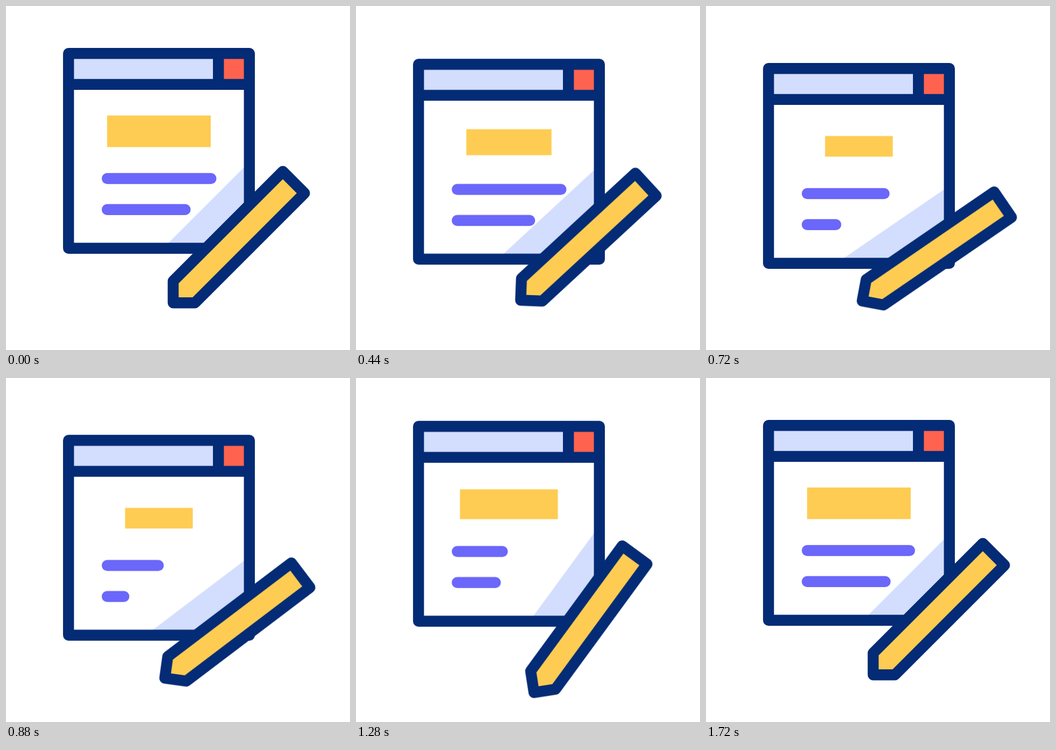
Animation, 640 px wide and 640 px high, one loop 1.76 s. Source, as an HTML page:

```html
<!DOCTYPE html>
<html lang="en">
<head>
<meta charset="utf-8">
<title>Editing a page</title>
<style>
  html, body { margin: 0; width: 100%; height: 100%; overflow: hidden; background: #fff; }
  svg { display: block; width: 100vw; height: 100vh; }

  .outline { stroke: #042b75; stroke-width: 20.4; stroke-linejoin: round; stroke-linecap: round; }
  .text { stroke: #6a67fa; stroke-width: 20.4; stroke-linecap: round; }
  .yellow { fill: #fecc52; }
  .pale { fill: #d3ddfd; }

  .window, .hold, .slide, .tilt, .banner, .text { animation: 1760ms linear infinite; }
  .window { --drop: 28px; animation-name: drop; }
  .hold { --drop: -28px; animation-name: drop; } /* cancels the window's own drop */
  .slide { animation-name: slide; }
  .tilt { animation-name: tilt; transform-origin: 433.4px 430px; }
  .banner { animation-name: shrink; transform-origin: 284.5px 233px; }
  .long { animation-name: long; }
  .short { animation-name: short; }

  @keyframes drop {
    0%, 6.42% { transform: translateY(0); animation-timing-function: cubic-bezier(.6, 0, .5, 1); }
    35.45%, 47.78% { transform: translateY(var(--drop)); animation-timing-function: cubic-bezier(.42, 0, .4, 1); }
    80.4%, 100% { transform: translateY(0); }
  }
  @keyframes shrink {
    0%, 5.23% { transform: scale(1); animation-timing-function: cubic-bezier(.6, 0, .5, 1); }
    41.7%, 51.02% { transform: scale(.653); animation-timing-function: cubic-bezier(.42, 0, .4, 1); }
    84.7%, 100% { transform: scale(1); }
  }
  @keyframes slide {
    0%, 25.45% { transform: translateY(0); animation-timing-function: cubic-bezier(.4, 0, .4, 1); }
    48.18%, 62.84% { transform: translateY(24px); animation-timing-function: cubic-bezier(.4, 0, .4, 1); }
    91.25%, 100% { transform: translateY(0); }
  }
  @keyframes tilt {
    0%, 18.75% { transform: rotate(0deg); animation-timing-function: cubic-bezier(.4, 0, .4, 1); }
    41.48%, 45% { transform: rotate(10.6deg); animation-timing-function: cubic-bezier(.4, 0, .4, 1); }
    67.1%, 70.45% { transform: rotate(-9deg); animation-timing-function: cubic-bezier(.4, 0, .4, 1); }
    94.3%, 100% { transform: rotate(0deg); }
  }
  @keyframes long {
    0%, 27.3% { stroke-dasharray: 193px 400px; animation-timing-function: cubic-bezier(.333, 0, .667, 1); }
    57.1%, 68.75% { stroke-dasharray: 79px 400px; animation-timing-function: cubic-bezier(.33, 0, .75, 1); }
    100% { stroke-dasharray: 193px 400px; }
  }
  @keyframes short {
    0%, 19.55% { stroke-dasharray: 145px 400px; animation-timing-function: cubic-bezier(.333, 0, .667, 1); }
    49.4%, 60.9% { stroke-dasharray: 31px 400px; animation-timing-function: cubic-bezier(.333, 0, .667, 1); }
    90.7%, 100% { stroke-dasharray: 145px 400px; }
  }
</style>
</head>
<body>
<svg viewBox="0 0 640 640" fill="none">
  <clipPath id="page"><rect x="120" y="150" width="330" height="297"/></clipPath>

  <g class="window">
    <g clip-path="url(#page)">
      <g class="hold"><g class="slide"><g class="tilt">
        <path class="pale" d="M593 150 193 550 233 590 633 190Z"/>
      </g></g></g>
    </g>
    <path class="pale" d="M116 88H395V146H116Z"/>
    <path fill="#ff6350" d="M395 88H453V146H395Z"/>
    <path class="outline" d="M116.3 88.2H452.8V450.8H116.3ZM116.3 145.9H452.8M395.2 88.2V145.9"/>
    <rect class="yellow banner" x="188.1" y="203.7" width="192.8" height="58.8"/>
    <path class="text long" d="M188.3 321H381.3"/>
    <path class="text short" d="M188.3 378.7H333.3"/>
  </g>

  <g class="slide"><g class="tilt">
    <path class="yellow outline" d="M311 552.3V511.8L515 307.8 555.4 348.3 351.4 552.3Z"/>
  </g></g>
</svg>
</body>
</html>
```
